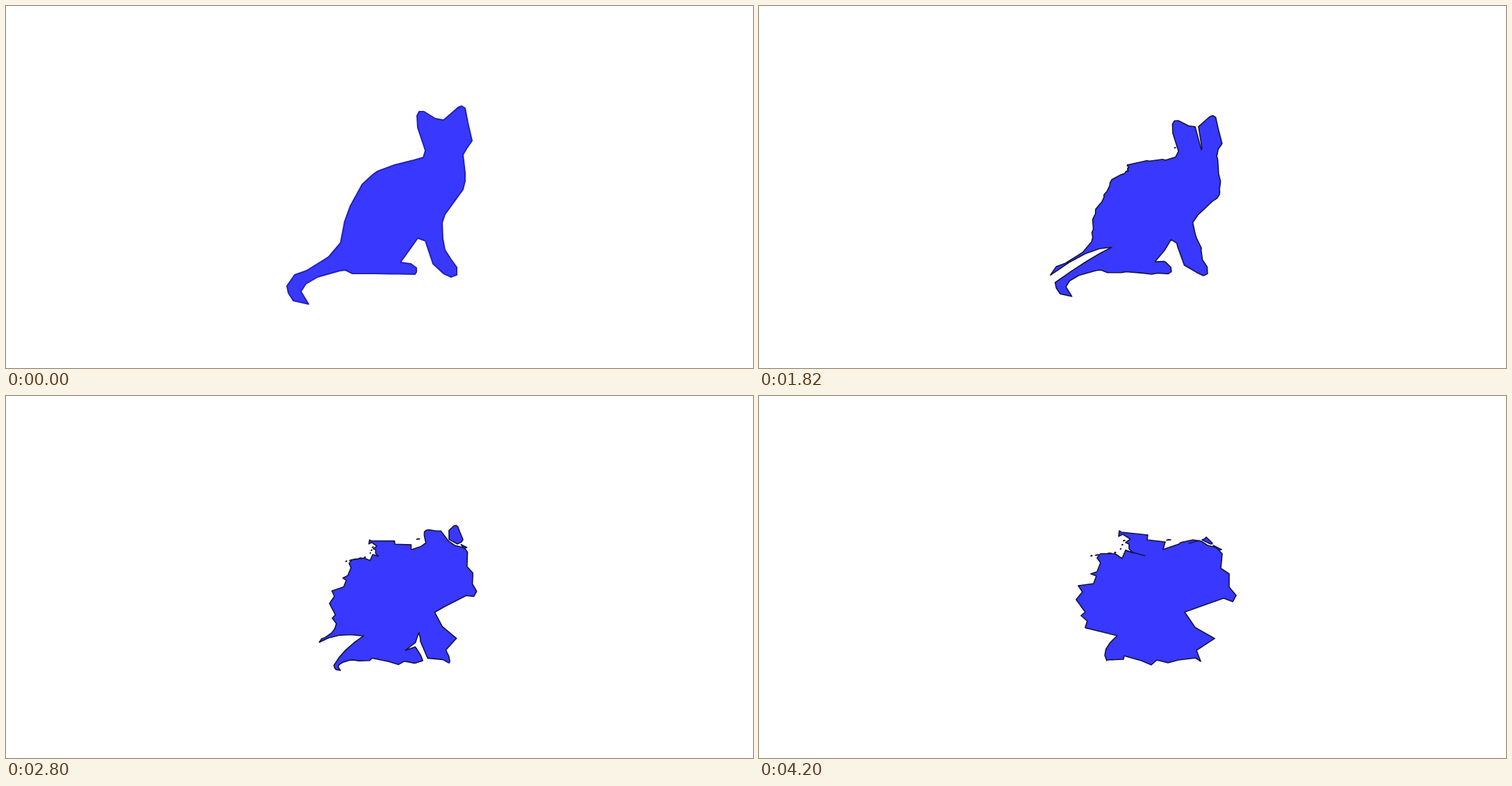
These frames come from a looping animation (1074 by 521 pixels, 4830 ms). An HTML page:

```html
<!DOCTYPE html>
<html lang="en">
<head>
<meta charset="utf-8">
<title>Cat to map morph</title>
<style>
html, body { margin: 0; width: 100%; height: 100%; overflow: hidden; background: #fff; }
svg { display: block; width: 100vw; height: 100vh; }
path { stroke-linejoin: round; stroke-linecap: round; }
</style>
</head>
<body>
<svg viewBox="0 0 1074 521">
  <g id="art" fill="#3838ff">
    <path id="islands"/>
    <path id="body"/>
    <path id="cuts" fill="none" d="M527 222L555 230M618 212L633 208"/>
  </g>
</svg>
<script>
const LOOP = 4830, STEP = 70, START = 630, MORPH = 3530, END = 4200;

const get = id => document.getElementById(id);
const clamp = v => Math.max(0, Math.min(1, v));
const mix = (a, b, k) => [a[0] + (b[0] - a[0]) * k, a[1] + (b[1] - a[1]) * k];
const ease = u => u < .5 ? 2 * u * u : 1 - 2 * (1 - u) ** 2;
const trace = pts => "M" + pts.map(q => q[0].toFixed(2) + " " + q[1].toFixed(2)).join("L") + "Z";
const points = text => text.trim().split(/\s*,\s*/).map(q => q.split(" ").map(Number));

// Share of the line's length reached at each of its points.
function shares(line) {
  let sum = 0;
  const run = line.map((q, i) => sum += i ? Math.hypot(q[0] - line[i - 1][0], q[1] - line[i - 1][1]) : 0);
  return run.map(v => v / sum);
}

function along(line, marks, s) {
  const i = Math.max(1, marks.findIndex(m => m >= s));
  return mix(line[i - 1], line[i], (s - marks[i - 1]) / (marks[i] - marks[i - 1]));
}

// Each entry is "cat > map". Its first points are landmarks that meet; up to the
// next landmark both lines are matched by their length.
function chain(...entries) {
  const parts = entries.map(e => e.split(">").map(points));
  const pairs = [];
  for (let i = 0; i + 1 < parts.length; i++) {
    const lines = parts[i].map((line, side) => [...line, parts[i + 1][side][0]]);
    const marks = lines.map(shares);
    const stops = [...new Set(marks.flat())].filter(s => s < 1).sort((a, b) => a - b);
    for (const s of stops) pairs.push(lines.map((line, side) => along(line, marks[side], s)));
  }
  pairs.push(parts.at(-1).map(line => line[0]));
  return p => pairs.map(([a, b]) => mix(a, b, p));
}

const ear = chain(
  "629.5 164, 650 146, 655 144, 660 147, 664 168, 670 194 > 640 206, 643 203, 652 212",
  "663 204 > 651 213"
);
const front = chain(
  "657 214 > 662 223, 666 227",
  "660 240 > 664 248",
  "660 252, 657 264 > 676 256, 676 275, 686 287",
  "652 271, 631 300 > 681 296, 668 291",
  "627 312, 628 335, 631 351 > 612 311, 627 333, 655 349",
  "640 365, 648 376, 648 387, 640 390 > 629 366, 635 382",
  "629 385 > 628 377",
  "614 371 > 603 380"
);
const paws = chain(
  "614 371, 603 338 > 603 380, 592 357",
  "592 334 > 594 343, 592 357",
  "567 369, 582 371, 590 377 > 577 365, 592 357",
  "590 383 > 603 380"
);
const rear = chain(
  "590 383 > 603 380",
  "588 386 > 588 384, 572 380, 564 387, 550 381",
  "529 385, 498 385, 488 380 > 525 374, 524 379",
  "480 381, 448 390, 431 400, 424 411, 435 429, 413 424, 406 413 > 500 380",
  "404 403 > 500 381"
);
const back = chain(
  "404 403, 415 387, 432 381, 464 361 > 470 334",
  `481 341, 487 310, 495 288, 512 257 > 469 333, 472 324, 463 316, 469 311, 456 293, 465 282,
   459 273, 481 270, 485 259, 477 256, 486 253, 491 240, 486 233, 491 227, 512 227`,
  "527 243 > 522 234, 527 222, 538 226, 532 220, 532 213, 527 211, 534 206, 523 199, 517 202, 518 194",
  "534 238, 558 229 > 521 196, 559 200, 558 207, 584 210",
  "586 222, 600 218 > 581 221",
  "603 208, 592 175 > 604 213",
  "591 158, 594 152, 601 152, 617 162 > 606 211, 619 208",
  "628 164 > 624 207"
);

const bend = (a, c, b) => [.25, .5, .75].map(k => mix(mix(a, c, k), mix(c, b, k), k));

// The wedge that splits the tail, from its lower to its upper lip.
function tailSlot(low, top, p) {
  const k = Math.min(48, 1 / Math.max(p, .001) - 1);
  const tip = [515 - 2.3 * k, 345 + .62 * k + .0135 * k * k];
  const open = clamp((p - .065) / .16);
  const under = mix(mix(low, tip, .5), [470 + 20 * p, 362 + 4 * p], open);
  const over = mix(mix(top, tip, .5), [475, 349 - 14 * p], open);
  return [...bend(low, under, tip), tip, ...bend(tip, over, top)];
}

function outline(p) {
  const right = ear(p), low = rear(p), up = back(p);
  const rest = [
    ...front(p), ...(p < .9 ? paws(p) : []), ...low,
    ...tailSlot(low.at(-1), up[0], p), ...up
  ];

  // The cut between the ears deepens, then runs sideways and frees the right ear.
  const notch = mix(up.at(-1), right[0], .5);
  const depth = clamp((p - .07) / .16), reach = clamp((p - .25) / .27);
  const inner = mix(notch, [636, 207 + 2 * p], depth);
  const base = mix(notch, [637, 205 + 2 * p], depth);
  const coast = [inner, mix(inner, [645, 215], reach), mix(inner, [657, 218], reach)];
  const tipEdge = [mix(base, [649, 213], reach), base, ...right];
  if (!depth) return trace([...right, ...rest]);
  return p < .5 ? trace([...coast, ...tipEdge, ...rest])
                : trace([...coast, ...rest]) + trace(tipEdge);
}

function islands(p) {
  if (p < .2) return "";
  const speck = (from, to, w) => {
    const [x, y] = mix(from, to, p);
    return trace([[x - w * p, y + .4], [x, y - .4], [x + w * p, y]]);
  };
  let d = speck([601, 203], [589, 207], 3);
  for (let i = 0; i < 5; i++) d += speck([516 + 2.5 * i, 256 - 2 * i], [478 + 8.5 * i, 230 - 1.2 * i], i % 4 ? 3 : 1);
  for (let i = 0; i < 3; i++) d += speck([533, 240], [520 + 2.5 * i, 220 - 6 * i], .5 + i / 3);
  const [x, y] = mix([657, 211], [659, 219], p);
  return d + trace([[x - 6 * p, y - 4 * p], [x + 6 * p, y + 2 * p], [x, y + 4 * p]]);
}

function draw(ms) {
  const t = Math.floor((ms % LOOP) / STEP) * STEP;
  const p = ease(clamp((t - START) / MORPH));
  const first = t < STEP;
  get("body").setAttribute("d", outline(p));
  get("islands").setAttribute("d", islands(p));
  get("art").setAttribute("stroke", first ? "#2222b8" : "#14143c");
  get("art").setAttribute("stroke-width", first ? 2 : 1.6);
  get("cuts").setAttribute("visibility", t >= END ? "visible" : "hidden");
}

let origin;
function tick(now) {
  origin ??= now;
  draw(now - origin);
  requestAnimationFrame(tick);
}
draw(0);
requestAnimationFrame(tick);
</script>
</body>
</html>
```
